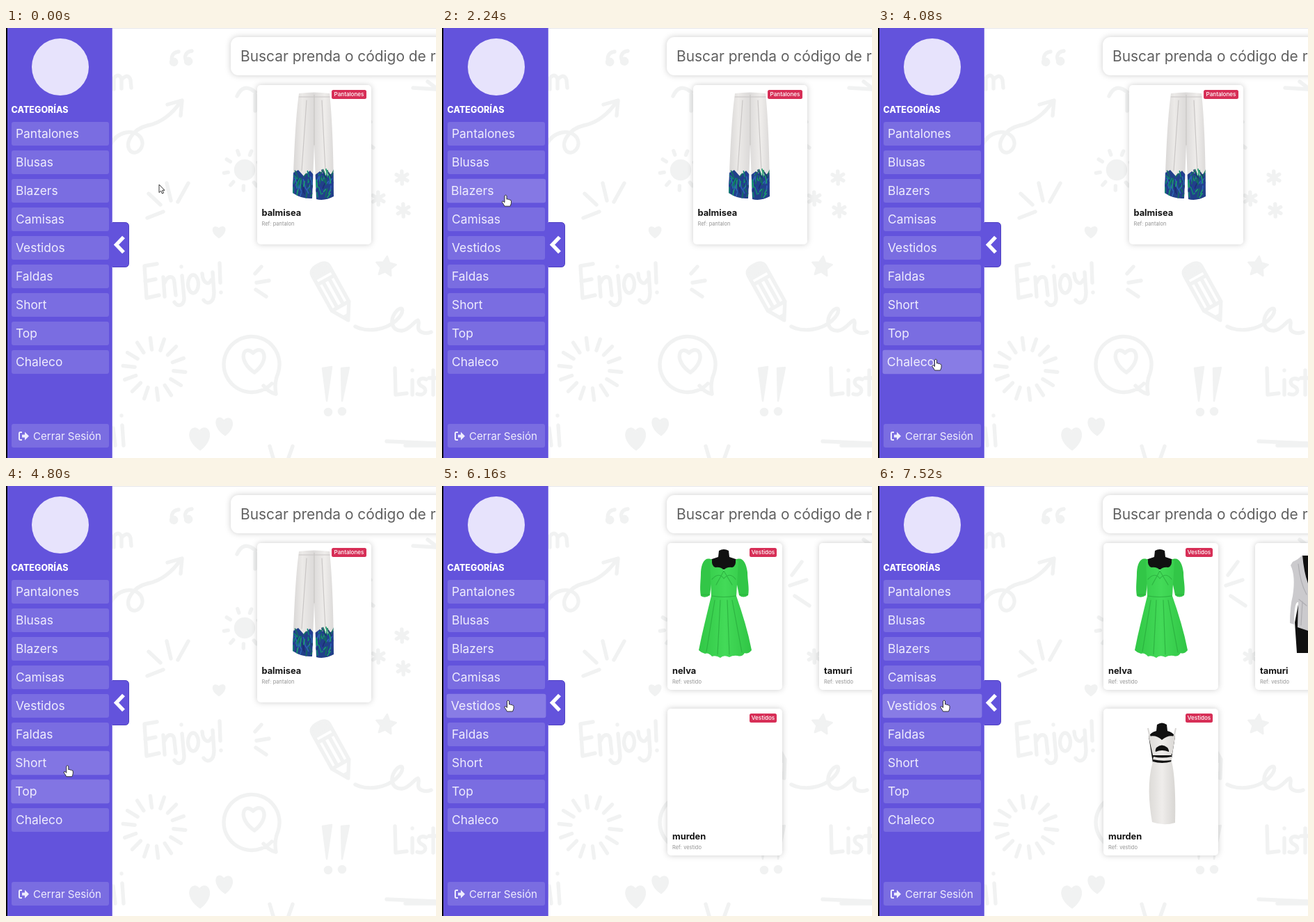
Animation of 618x618 px, one loop 7600 ms. Source, as an HTML page:

```html
<!DOCTYPE html>
<html lang="es">
<head>
<meta charset="utf-8">
<title>Catálogo de prendas</title>
<style>
  html, body { margin: 0; width: 100%; height: 100%; overflow: hidden; background: #fff; }
  svg { display: block; width: 100vw; height: 100vh; }
  text { font-family: Inter, "Open Sans", sans-serif; }
  .doodles { fill: none; stroke: #f1f2f2; stroke-width: 5.4; stroke-linecap: round; stroke-linejoin: round; }
  .doodles .solid { fill: #f1f2f2; stroke-width: 2.5; }
  .panel { fill: #fff; filter: drop-shadow(0 0 4px rgba(0, 0, 0, .2)); }
  .search { font-size: 20.9px; fill: #606060; }
  .name { font-size: 12.8px; font-weight: 700; fill: #151515; }
  .ref { font-size: 7.5px; fill: #939393; }
  .badge { fill: #d72f57; }
  .tag { font-size: 8.1px; font-weight: 500; fill: #fff; text-anchor: middle; }
  .side { fill: #6353dc; }
  .item { fill: #fff; fill-opacity: .15; }
  .label { font-size: 17.4px; fill: #efedfd; }
  .head { font-size: 12.5px; font-weight: 800; fill: #fff; }
  .exit { font-size: 15.1px; fill: #efedfd; }
  .fold { fill: none; stroke-width: 1.2; stroke-linecap: round; }
</style>
</head>
<body>
<svg viewBox="0 0 618 618">
  <defs>
    <linearGradient id="linen" x2="1">
      <stop offset="0" stop-color="#d5d3d2"/><stop offset=".25" stop-color="#eceae8"/>
      <stop offset=".5" stop-color="#dcdad9"/><stop offset=".75" stop-color="#efedeb"/>
      <stop offset="1" stop-color="#d6d4d3"/>
    </linearGradient>
    <linearGradient id="green" x2="1">
      <stop offset="0" stop-color="#31c746"/><stop offset=".5" stop-color="#43da58"/>
      <stop offset="1" stop-color="#30c545"/>
    </linearGradient>
    <linearGradient id="cotton" x2="1">
      <stop offset="0" stop-color="#dcdad7"/><stop offset=".5" stop-color="#efedeb"/>
      <stop offset="1" stop-color="#d8d6d3"/>
    </linearGradient>
    <clipPath id="legs">
      <path d="M421 94Q443 91 465 94C469 130 471 190 471 242Q458 249 446 246L443 168L440 245Q425 246 412 237C414 180 416 130 421 94Z"/>
    </clipPath>
  </defs>

  <rect width="618" height="618" fill="#fff"/>

  <g class="doodles" id="doodles">
    <!-- quotes, letter, looping arrow -->
    <path d="M248 34C239 35 236 43 240 50M267 33C258 34 255 42 260 49"/>
    <path class="solid" d="M240 44a5 5 0 1 0 5 8a5 5 0 0 0-5-8M261 43a5 5 0 1 0 5 8a5 5 0 0 0-5-8"/>
    <path d="M155 88V72Q162 64 166 73V87M166 74Q176 64 179 75L180 86"/>
    <path d="M150 168C160 148 184 144 194 158C201 171 188 184 179 177C169 166 182 145 204 140C224 136 240 122 250 107M232 110L253 104L251 126"/>
    <!-- strokes and small heart -->
    <path d="M205 238L222 254M231 223L237 248M262 223L247 250M203 273L226 264"/>
    <path class="solid" d="M306 301C292 291 299 282 306 289C314 281 320 292 306 301Z"/>
    <!-- lettering -->
    <path d="M217 339L199 342L202 388L220 384M200 364L215 361"/>
    <path d="M226 358L228 386M228 366C233 354 242 356 242 366L244 384"/>
    <path d="M253 356L256 388C256 400 246 401 242 394M252 343v.1"/>
    <ellipse cx="269" cy="368" rx="7.500" ry="13"/>
    <path d="M282 353C283 368 292 370 295 362M297 351L299 380C299 396 289 398 284 391"/>
    <path d="M307 338L308 366M309 380v.1"/>
    <path d="M358 353L367 343M360 366L378 363M359 376L374 386"/>
    <!-- pencil and scribble -->
    <g transform="translate(468 377) rotate(-29)">
      <path d="M-14 26V-31Q-14-41 0-41T14-31V26L0 49ZM-14-26H14M-14-17H14M-5-16V24M5-16V24M-14 26H14"/>
      <path class="solid" d="M-13-28Q-12-40 0-40T13-28ZM-5 41H5L0 49Z"/>
    </g>
    <path d="M502 429C520 438 545 434 560 421C574 408 571 398 562 406C550 419 554 436 569 435C580 434 586 422 592 420C596 423 588 433 597 437Q604 440 611 437"/>
    <!-- bubble -->
    <path d="M382 511A40 40 0 1 1 391 496Q385 510 388 526Q378 524 370 514"/>
    <path d="M357 495C332 478 341 454 355 467C370 453 381 477 357 495Z"/>
    <!-- exclamation marks -->
    <path d="M455 489L461 536L468 487ZM482 489L483 536L493 488Z" class="solid"/>
    <circle class="solid" cx="463" cy="552" r="5"/><circle class="solid" cx="483" cy="551" r="5"/>
    <path d="M559 489L560 527L576 525M584 506V527M584 492v.1M604 505C592 500 590 512 598 515C607 519 602 530 591 526M614 492V527M608 503H618"/>
    <!-- lower edge -->
    <path class="solid" d="M279 606C253 588 268 566 278 580C288 566 303 587 279 606ZM315 585C294 571 304 552 313 565C324 554 332 572 315 585Z"/>
    <path d="M154 575L157 600M167 571L169 600M166 557v.1M379 601L384 618M412 601L406 618M547 594L618 597M574 600L618 600"/>
    <!-- top right -->
    <path d="M332 98Q341 78 358 92M358 96V119M503 128L517 109M500 143L524 135M507 158L528 172M585 86L618 88M606 77L618 86"/>
    <circle class="solid" cx="343" cy="204" r="14"/>
  </g>

  <g id="trousers">
    <rect class="panel" x="361" y="82" width="164" height="229" rx="5"/>
    <g clip-path="url(#legs)" id="print">
      <rect x="410" y="90" width="64" height="160" fill="url(#linen)"/>
      <path class="fold" stroke="#c9c6c5" d="M421 99H466M443 96V168M432 104L425 205M454 104L459 205"/>
      <path d="M410 210L420 204L428 213L437 205L443 212L451 206L461 213L474 206V250H410Z" fill="#21408a"/>
    </g>
  </g>

  <g id="dresses">
    <rect class="panel" x="324" y="82" width="165" height="211" rx="5"/>
    <rect class="panel" x="542" y="82" width="165" height="211" rx="5"/>
    <rect class="panel" x="324" y="320" width="165" height="211" rx="5"/>

    <g id="greenDress">
      <path d="M398 93Q405 89 412 93L413 102Q421 104 427 108L420 120H390L383 108Q389 104 397 102Z" fill="#111"/>
      <path d="M388 106C378 101 373 110 372 124C372 136 370 146 372 158Q378 162 385 157L388 132ZM422 106C432 101 437 110 439 124C439 136 442 146 440 157Q433 162 427 157L422 132Z" fill="#32c647"/>
      <path d="M385 108L388 106Q387 115 393 117Q401 116 405 121Q409 116 417 117Q423 115 422 106L426 108L423 158C432 184 440 210 445 236Q440 242 435 240Q431 246 425 244Q418 243 413 246Q405 242 400 247Q394 243 388 245Q383 239 378 241Q373 240 369 236C374 210 381 183 387 158Z" fill="url(#green)"/>
      <path class="fold" stroke="#25a53a" stroke-opacity=".65" d="M388 158Q405 161 422 158M392 164L380 238M400 164L396 242M410 164L413 242M417 164L431 239M388 134Q398 123 405 133Q414 123 422 134M405 122L394 142M405 122L417 142M373 156H384M428 156H439"/>
    </g>

    <g id="wrapDress">
      <path d="M610 100H618V240H602L599 196L608 150Z" fill="#101010"/>
      <path d="M596 109Q605 105 610 99Q612 124 618 140V208L603 203L604 167Q598 165 598 199L592 197Q592 173 596 158C599 139 598 124 593 114Z" fill="#cbcacd"/>
      <path class="fold" stroke="#aeadb1" d="M604 112Q607 140 616 156M605 163L616 172M610 166L608 200"/>
    </g>

    <g id="whiteDress">
      <path d="M401 343Q408 338 415 343L416 352Q424 354 427 360L421 398H395L389 360Q392 354 400 352Z" fill="#111"/>
      <path d="M388 348L391 362M428 348L425 362" fill="none" stroke="#d8d6d4" stroke-width="2"/>
      <path d="M389 360Q400 357 408 365Q417 357 427 360L423 385H418Q419 380 416 376Q408 369 400 376Q398 380 399 382Q408 378 418 382L423 387H395ZM396 389Q408 392 422 389V394Q408 396 395 393ZM395 396Q408 400 422 396C427 415 428 455 427 484Q411 489 394 483C389 454 387 424 395 396Z" fill="url(#cotton)"/>
    </g>
  </g>

  <rect class="panel" x="323" y="13" width="330" height="55" rx="11"/>
  <text class="search" x="337" y="48">Buscar prenda o código de referencia</text>
  <rect x="152" width="466" height="1" fill="#e6e6ea"/>

  <g id="sidebar">
    <path d="M150 279.500H171Q176.500 279.500 176.500 285V338Q176.500 343.500 171 343.500H150Z" fill="#6353dc" stroke="#5143c2"/>
    <rect class="side" width="152.500" height="618"/>
    <rect x="152" width="1" height="618" fill="#8b7fe5"/>
    <rect x="151" y="280" width="4" height="63" class="side"/>
    <rect width="2" height="618" fill="#08070d"/>
    <path d="M169 300.500L158.500 311.500L169 322.500" fill="none" stroke="#fff" stroke-width="5.400"/>
    <circle cx="78" cy="56" r="41" fill="#e7e3fc"/>
    <text class="head" x="7.500" y="121.500">CATEGORÍAS</text>
    <rect class="item" x="8" y="569" width="140" height="34" rx="3"/>
    <path d="M23 581H20.500Q19 581 19 583V590Q19 592 20.500 592H23" fill="none" stroke="#efedfd" stroke-width="2"/>
    <path d="M23 584.500H27V580.500L33 586.500L27 592.500V588.500H23Z" fill="#efedfd"/>
    <text class="exit" x="39" y="591.500">Cerrar Sesión</text>
  </g>

  <g id="cursor" stroke="#222" stroke-linejoin="round" fill="#fff">
    <path id="arrow" d="M0 0V11.500L2.700 9L4.500 13L6.500 12L4.700 8.200H8Z" stroke-width=".9"/>
    <path id="hand" d="M-1.500 1Q0-1 1.500 1V6Q3 5 4 6.500Q5.500 5.700 6.300 7.200Q8 6.800 8 8.500V11.500Q7.500 14 6.500 16H-1.500Q-3 13-5 10.500Q-5.500 8.500-3.500 8.800L-1.500 10.500Z" stroke-width=".9"/>
  </g>
</svg>

<script>
const LOOP = 7600, STEP = 80;
const $ = id => document.getElementById(id);

function add(parent, tag, attrs, text) {
  const el = document.createElementNS('http://www.w3.org/2000/svg', tag);
  for (const key in attrs) el.setAttribute(key, attrs[key]);
  if (text) el.textContent = text;
  return parent.appendChild(el);
}

// Doodles made of spokes around a centre
function rays(cx, cy, from, to, count, turn = 0) {
  let d = '';
  for (let i = 0; i < count; i++) {
    const a = turn + i * 2 * Math.PI / count, c = Math.cos(a), s = Math.sin(a);
    d += `M${cx + from * c} ${cy + from * s}L${cx + to * c} ${cy + to * s}`;
  }
  add($('doodles'), 'path', { d });
}
rays(213, 490, 28, 45, 14, 0.1);
rays(342, 204, 23, 29, 9, 0.2);
for (const [x, y] of [[569, 215], [571, 262], [535, 245]]) rays(x, y, 0, 9, 6, 0.5);

const star = Array.from({ length: 10 }, (_, i) => {
  const r = i % 2 ? 7.5 : 15, a = i * Math.PI / 5 - 1.45;
  return [546 + r * Math.cos(a), 343 + r * Math.sin(a)];
});
add($('doodles'), 'polygon', { points: star.join(' '), class: 'solid' });

// Leaf print on the trouser hems
let seed = 11;
const random = () => (seed = seed * 16807 % 2147483647) / 2147483647;
const leaves = ['#0f8a72', '#1aa06a', '#1c2f74', '#2c62b4', '#12705f', '#253d9a'];
for (let i = 0; i < 75; i++) {
  const x = 412 + random() * 59, y = 212 + random() * 33;
  const dx = (random() - 0.5) * 12, dy = 5 + random() * 8;
  add($('print'), 'path', {
    d: `M${x} ${y}q${dx / 3} ${-dy / 2} ${dx} ${-dy}`, fill: 'none',
    stroke: leaves[Math.floor(random() * leaves.length)], 'stroke-width': 1.6
  });
}

function caption(group, x, y, name, ref, tag, tagX, tagW) {
  add(group, 'text', { class: 'name', x: x + 7, y: y + 188 }, name);
  add(group, 'text', { class: 'ref', x: x + 7, y: y + 202 }, 'Ref: ' + ref);
  add(group, 'rect', { class: 'badge', x: tagX, y: y + 7, width: tagW, height: 13, rx: 2.5 });
  add(group, 'text', { class: 'tag', x: tagX + tagW / 2, y: y + 16.4 }, tag);
}
caption($('trousers'), 360.5, 82, 'balmisea', 'pantalon', 'Pantalones', 468, 50);
caption($('dresses'), 324, 82, 'nelva', 'vestido', 'Vestidos', 442, 39);
caption($('dresses'), 542, 82, 'tamuri', 'vestido', 'Vestidos', 660, 39);
caption($('dresses'), 324, 320, 'murden', 'vestido', 'Vestidos', 442, 39);

const labels = ['Pantalones', 'Blusas', 'Blazers', 'Camisas', 'Vestidos', 'Faldas', 'Short', 'Top', 'Chaleco'];
const items = labels.map((label, i) => {
  const y = 135 + 41 * i, g = add($('sidebar'), 'g', {});
  const box = add(g, 'rect', { class: 'item', x: 8, y, width: 140, height: 34, rx: 3 });
  add(g, 'text', { class: 'label', x: 14, y: y + 23.2 }, label);
  return { g, box, y };
});

// Pointer stops: time, x, y
const stops = [
  [0, 220, 225], [160, 220, 225], [800, 95, 142], [1300, 95, 142],
  [3920, 83, 476], [4320, 83, 476], [5360, 95, 308], [LOOP, 95, 308]
];
function pointer(t) {
  t = Math.max(0, t);
  const i = stops.findIndex((s, k) => k && t <= s[0]);
  const [t0, x0, y0] = stops[i - 1], [t1, x1, y1] = stops[i];
  const u = (t - t0) / (t1 - t0), e = u * u * (3 - 2 * u);
  return [x0 + (x1 - x0) * e, y0 + (y1 - y0) * e];
}
const over = ([x, y], item) => x >= 8 && x <= 148 && y >= item.y && y <= item.y + 34;

const show = (id, on) => { $(id).style.display = on ? '' : 'none'; };

function draw(t) {
  const p = pointer(t);
  const trail = [0, 50, 100, 150].map(lag => pointer(t - lag));
  for (const item of items) {
    const heat = trail.filter(q => over(q, item)).length / trail.length;
    const cy = item.y + 17, k = 1 + 0.02 * heat;
    item.g.setAttribute('transform', `translate(78 ${cy}) scale(${k}) translate(-78 ${-cy})`);
    item.box.style.fillOpacity = 0.15 + 0.09 * heat;
  }
  const hand = items.some(item => over(p, item));
  show('hand', hand);
  show('arrow', !hand);
  $('cursor').setAttribute('transform', `translate(${p})`);

  show('trousers', t < 5920);
  show('dresses', t >= 5920);
  show('greenDress', t >= 6160);
  show('wrapDress', t >= 6560);
  show('whiteDress', t >= 7200);
}

const start = performance.now();
function tick() {
  const t = (performance.now() - start) % LOOP;
  draw(Math.floor(t / STEP) * STEP);
  requestAnimationFrame(tick);
}
tick();
</script>
</body>
</html>
```
